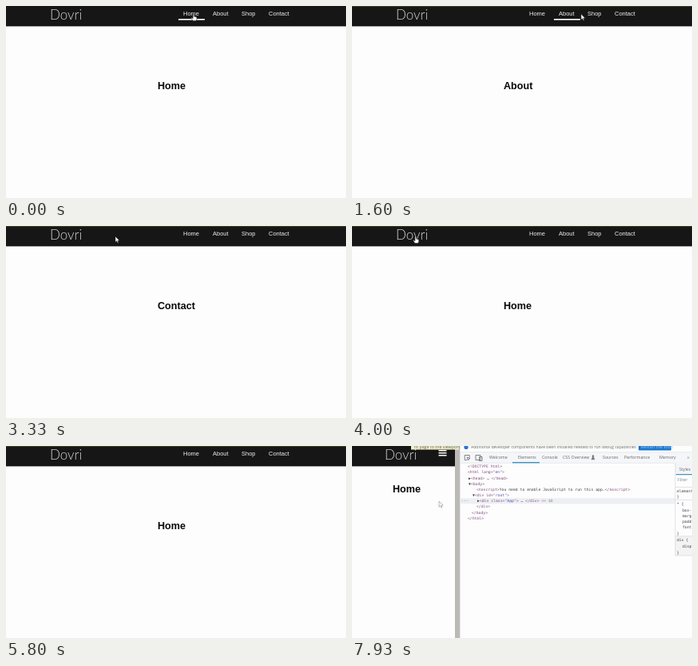
Write an HTML page that moves like this. It is 426 px wide and 240 px high and loops after 8000 ms.

```html
<!DOCTYPE html>
<html lang="en">
<head>
<meta charset="utf-8">
<title>Navigation bar</title>
<style>
html, body { margin: 0; width: 100%; height: 100%; overflow: hidden; background: #fdfdfd; }
svg { display: block; width: 100vw; height: 100vh; }
text { white-space: pre; }
.logo { font: 300 17px Lato, sans-serif; fill: #d2d2d2; }
.nav { font: 7.5px "Liberation Sans", Arial, sans-serif; fill: #eee; }
.title { font: bold 12.6px "Liberation Sans", Arial, sans-serif; fill: #080808; }
.ui { font: 5.3px "Open Sans", sans-serif; fill: #666; }
.code { font: 4.77px "DejaVu Sans Mono", monospace; fill: #444; }
.tag { fill: #84507f; }
.val { fill: #4a55b4; }
.dim { fill: #888; }
</style>
</head>
<body>
<svg viewBox="0 0 426 240" preserveAspectRatio="none">
  <rect width="426" height="240" fill="#fdfdfd"/>
  <rect id="bar" width="426" height="25.4" fill="#161617"/>
  <rect id="edge" width="426" height="0.8" fill="#4e4a1c"/>
  <text id="logo" class="logo" y="16.5">Dovri</text>
  <g id="nav" class="nav"></g>
  <rect id="line" y="16" height="1.6" fill="#fff"/>
  <path id="menu" d="M0 5.8h10M0 8.8h10M0 11.8h10" stroke="#fff" stroke-width="1.5"/>
  <text id="title" class="title"></text>

  <g id="tools">
    <g id="dock">
      <rect x="-7" width="440" height="240" fill="#fdfdfd"/>
      <rect x="-7" width="6" height="240" fill="#bab9b4"/>
      <rect x="-1" width="1" height="240" fill="#e6e6ea"/>
      <rect x="-62" width="60" height="4.5" fill="#f3efc9"/>
      <text class="ui" x="-58" y="2.8">fit page to the viewport</text>
      <circle cx="7" cy="1.5" r="2.6" fill="#2672d8"/>
      <text class="ui" x="13" y="2.7" style="font-size:5.1px">Additional developer components have been installed needed to run debug capabilities</text>
      <rect x="223" y="-2" width="41" height="7.6" rx="1" fill="#1b78d0"/>
      <text class="ui" x="226" y="2.7" style="fill:#9fd0f4">Restart the tools</text>
      <rect y="8" width="440" height="13" fill="#f5f6f9"/>
      <path d="M0 21.3H440M0 7.8H440" stroke="#d9dbe0" stroke-width=".6"/>
      <path d="M8 17.5H5.2v-6h6v3M8 14l4 1.5-1.7.7-.7 1.8zM19 11.5h6v6h-6zM23.5 13.5h3.5v5h-3.5z" fill="none" stroke="#666" stroke-width=".8"/>
      <rect x="65" y="20" width="34" height="1.4" fill="#3f92c4"/>
      <g id="tabs" class="ui"></g>
      <path d="M164 16.8h4l-1.2-2v-3h-1.6v3z" fill="#777" stroke="#666" stroke-width=".6"/>
      <rect y="65.2" width="440" height="7.2" fill="#eeeff4"/>
      <g id="tree" class="code"></g>
    </g>
    <g>
      <rect x="405" y="21.6" width="21" height="219" fill="#fdfdfd"/>
      <rect x="405" y="21.6" width="21" height="14" fill="#f3f4f7"/>
      <rect x="405" y="113" width="21" height="24" fill="#f3f3f3"/>
      <path d="M405 21.6V137M405 51.5h21M405 67.5h21M405 112.7h21M405 137h21" stroke="#d0d2d8" stroke-width=".6"/>
      <rect x="406" y="35" width="20" height="1.2" fill="#3f92c4"/>
      <text class="ui" x="410" y="30.6">Styles</text>
      <text class="ui dim" x="408" y="44.3">Filter</text>
      <g id="rules" class="code"></g>
    </g>
  </g>

  <g id="mouse" stroke-width=".6" fill="#fff">
    <path id="arrow" d="M0 0V7.2L1.7 5.7 2.8 8.2 4 7.6 2.9 5.2H5.2Z"/>
    <path id="hand" d="M-.8 .3Q0-.6.8.3V3l3.2.8V6.5L3 8.5H-.8L-3 5.3-2.2 4.6-.8 5.6Z"/>
    <path id="resize" d="M-2.6 3 -1 1.2V2.3H1V1.2L2.6 3 1 4.8V3.7H-1V4.8Z"/>
  </g>
</svg>
<script>
const LOOP = 8000, OPEN = 6080;
const $ = id => document.getElementById(id);
const set = (id, attrs) => { for (const k in attrs) $(id).setAttribute(k, attrs[k]); };
const show = (id, on) => { $(id).style.display = on ? "" : "none"; };

const links = [["Home", 222, 20], ["About", 259, 20], ["Shop", 295, 18], ["Contact", 329, 26]];
const pages = [[0, "Home"], [950, "About"], [2050, "Shop"], [2650, "Contact"], [3750, "Home"]];

// time, x, y of the pointer tip
const path = [
  [0, 235, 10], [450, 235, 10], [850, 268, 10], [1250, 270, 10], [1600, 287, 10],
  [1900, 303, 10], [2150, 304, 10], [2500, 341, 10], [2850, 341, 10], [3330, 137, 13],
  [3650, 74, 11], [3950, 74, 11], [4600, 401, 131], [5000, 432, 150], [6250, 432, 165],
  [6450, 231, 165], [6930, 160, 165], [7350, 129, 163], [7930, 109, 69], [8000, 109, 69]
];
// time, width of the page beside the tools
const split = [[0, 231], [6450, 231], [6930, 160], [7350, 129], [8000, 129]];

function at(keys, t) {
  let i = 0;
  while (i < keys.length - 2 && t >= keys[i + 1][0]) i++;
  const a = keys[i], b = keys[i + 1];
  const u = Math.min(1, Math.max(0, (t - a[0]) / (b[0] - a[0])));
  const e = u * u * (3 - 2 * u);
  return a.slice(1).map((v, k) => v + (b[k + 1] - v) * e);
}

const label = (x, y, s) => `<text x="${x}" y="${y}">${s}</text>`;
const esc = s => s.replace(/</g, "&lt;").replace(/>/g, "&gt;");

function markup(s) {
  return esc(s)
    .replace(/&lt;.*?&gt;/g, m => `<tspan class="tag">${m.replace(/"(.*?)"/g, '"<tspan class="val">$1</tspan>"')}</tspan>`)
    .replace(/(== \$0)/, '<tspan class="dim">$1</tspan>');
}

$("nav").innerHTML = links.map(([s, x]) => label(x, 12, s)).join("");
$("tabs").innerHTML = [["Welcome", 36], ["Elements", 72], ["Console", 102], ["CSS Overview", 128],
  ["Sources", 178], ["Performance", 205], ["Memory", 249], ["»", 284]]
  .map(([s, x]) => label(x, 16.4, s)).join("");
$("tree").innerHTML = [
  [9, "<!DOCTYPE html>"], [9, '<html lang="en">'], [10, "▶<head> … </head>"], [10, "▼<body>"],
  [20, "<noscript>You need to enable JavaScript to run this app.</noscript>"],
  [15, '▼<div id="root">'], [21, '▶<div class="App"> … </div> == $0'],
  [20, "</div>"], [14, "</body>"], [9, "</html>"]
].map(([x, s], i) => label(x, 27.2 + i * 7.17, markup(s))).join("") + label(1, 70.2, "···");
$("rules").innerHTML = [[407, 58, "element.style {"], [407, 65, "}"], [407, 74, "* {"],
  [414, 82, "box-sizing"], [414, 89, "margin"], [414, 96, "padding"], [414, 103, "font-family"],
  [407, 111, "}"], [407, 119, "div {"], [414, 127, "display"], [407, 135, "}"]]
  .map(r => label(...r)).join("");

function render(t) {
  const open = t >= OPEN;
  const [x, y] = at(path, t);
  const [w] = at(split, t);
  const d = w - 129;

  set("bar", { width: open ? w : 426 });
  show("edge", t >= 70 && !open);
  set("logo", { x: open ? 41 + d * 0.516 : 55 });
  set("title", { x: open ? 51 + d * 0.45 : 190, y: open ? 57.7 + d * 0.15 : 104.3 });
  $("title").textContent = pages.filter(p => t >= p[0]).pop()[1];

  show("nav", !open);
  show("menu", open);
  set("menu", { transform: `translate(${w - 20.5})` });
  show("tools", open);
  set("dock", { transform: `translate(${w + 7})` });

  const inBar = !open && y < 25;
  const over = inBar && links.find(([, lx, lw]) => x > lx - 6 && x < lx + lw + 9);
  show("line", over);
  if (over) set("line", { x: over[1] - 6, width: over[2] + 13 });

  const linked = over && x < over[1] + over[2] + 7 || inBar && x < 94;
  const drag = t > 6400 && t < 7380;
  show("hand", linked);
  show("resize", drag);
  show("arrow", !linked && !drag);
  set("mouse", { transform: `translate(${x} ${y})`, stroke: inBar ? "#222" : "#888" });
}

const start = performance.now();
function tick() {
  render((performance.now() - start) % LOOP);
  requestAnimationFrame(tick);
}
tick();
</script>
</body>
</html>
```
